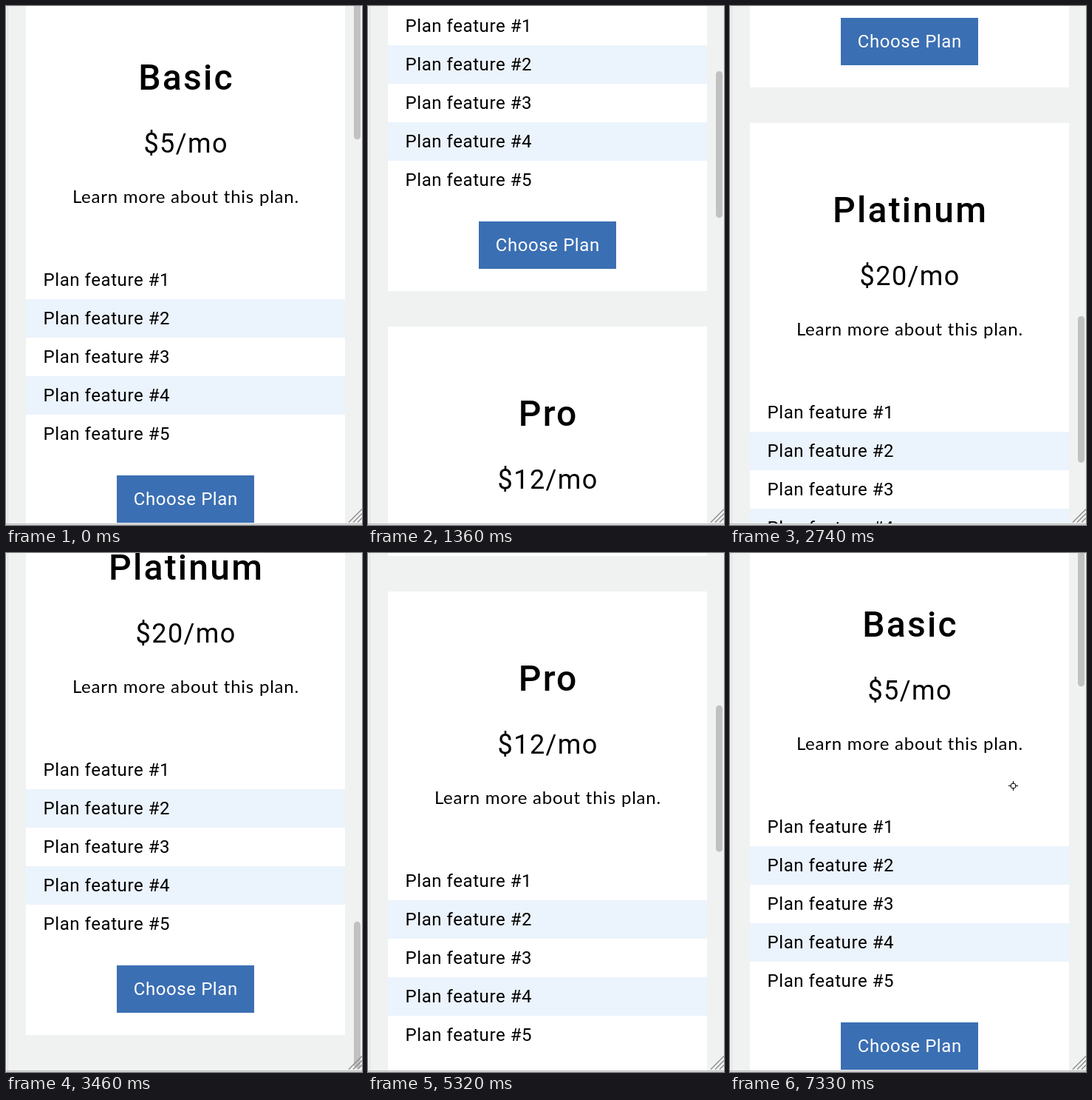
Recreate the animation shown at these times as an HTML page. Size 482 by 701 pixels, loop 7490 ms.

```html
<!DOCTYPE html>
<html lang="en">
<head>
<meta charset="utf-8">
<title>Pricing plans</title>
<style>
  html, body { margin: 0; width: 100%; height: 100%; overflow: hidden; background: #f0f1f1; }
  svg { display: block; width: 482px; height: 701px; }
  text { font: 24px Roboto, sans-serif; letter-spacing: .024em; white-space: pre; }
  .mid { text-anchor: middle; }
  .title { font-size: 48px; font-weight: 500; letter-spacing: .046em; }
  .price { font-size: 36px; letter-spacing: .04em; }
  .note { font-family: Lato, sans-serif; letter-spacing: .032em; }
</style>
</head>
<body>
<svg viewBox="0 0 482 701">
  <rect width="482" height="701" fill="#f0f1f1"/>
  <g id="page"></g>
  <rect id="thumb" x="471" width="9" height="198" rx="4.5" fill="#c1c1c1"/>
  <rect x="2" width="1" height="699" fill="#dcdddd"/>
  <path d="M464 697.5L482 679.5M470 697.5L482 685.5M476 697.5L482 691.5" stroke="#8c8c8c" stroke-width="1.3"/>
  <rect y="699" width="482" height="1" fill="#b4b4b4"/>
  <rect y="700" width="482" height="1" fill="#e3e3e3"/>
  <circle id="click" cx="371" cy="201" r="18" fill="#f8f870"/>
  <g id="cursor" fill="none" stroke="#000">
    <circle cx="383.5" cy="314.5" r="3.5" fill="#fff"/>
    <path d="M383.5 308v4M383.5 317v4M377 314.5h4M386 314.5h4"/>
  </g>
</svg>
<script>
const LOOP = 7490, PITCH = 797;
const $ = id => document.getElementById(id);

const rect = (x, y, w, h, fill) =>
  `<rect x="${x}" y="${y}" width="${w}" height="${h}" fill="${fill}"/>`;
const mid = (cls, y, str, shift, fill = '#000') =>
  `<text class="mid ${cls}" x="${243 + shift}" y="${y}" fill="${fill}">${str}</text>`;

function card([name, price], i) {
  let out = rect(27, -21, 432, 749, '#fff')
    + mid('title', 113, name, 1.1)
    + mid('price', 198, price + '/mo', .7)
    + mid('note', 266, 'Learn more about this plan.', .4);
  for (let n = 0; n < 5; n++) {
    const y = 344 + 52 * n;
    if (n % 2) out += rect(27, y, 432, 52, '#ebf3fc');
    out += `<text x="50.5" y="${y + 34}">Plan feature #${n + 1}</text>`;
  }
  out += rect(150, 634, 186, 64, '#3b6fb3') + mid('', 674, 'Choose Plan', .3, '#fff');
  return `<g transform="translate(0 ${i * PITCH})">${out}</g>`;
}
$('page').innerHTML = [['Basic', '$5'], ['Pro', '$12'], ['Platinum', '$20']].map(card).join('');

// Screen refreshes: start, end, number of equal steps
const spans = [
  [970, 1360, 5], [1360, 1660, 4], [1760, 2060, 4],
  [2210, 2740, 7], [2740, 2910, 2], [2990, 3460, 6],
  [4240, 4680, 6], [4680, 4930, 3], [5020, 5700, 9],
  [5800, 6030, 3], [6030, 6400, 4]
];
const ticks = spans.flatMap(([a, b, n]) =>
  Array.from({ length: n + 1 }, (_, i) => a + (b - a) * i / n));

// Scroll position: time, pixels
const keys = [
  [0, 0], [900, 0], [1000, 50], [1360, 343], [1760, 700], [2060, 830], [2150, 830],
  [2740, 1415], [3000, 1590], [3460, 1671], [4170, 1671], [4680, 1131],
  [5350, 650], [6030, 230], [6200, 90], [6400, 0], [LOOP, 0]
];
function scrollAt(t) {
  const i = keys.findIndex(k => k[0] > t);
  const [t0, s0] = keys[i - 1], [t1, s1] = keys[i];
  return s0 + (s1 - s0) * (t - t0) / (t1 - t0);
}

const show = (id, on) => $(id).setAttribute('visibility', on ? 'visible' : 'hidden');

function draw(now) {
  const t = now % LOOP;
  const snapped = Math.max(0, ...ticks.filter(k => k <= t + .01));
  const s = Math.round(scrollAt(snapped));
  $('page').setAttribute('transform', `translate(0 ${-s})`);
  $('thumb').setAttribute('y', -17.8 + s * .3086);
  show('click', t >= 5950 && t < 6122);
  show('cursor', t >= 7330);
}

const start = performance.now();
function frame() {
  draw(performance.now() - start);
  requestAnimationFrame(frame);
}
frame();
</script>
</body>
</html>
```
